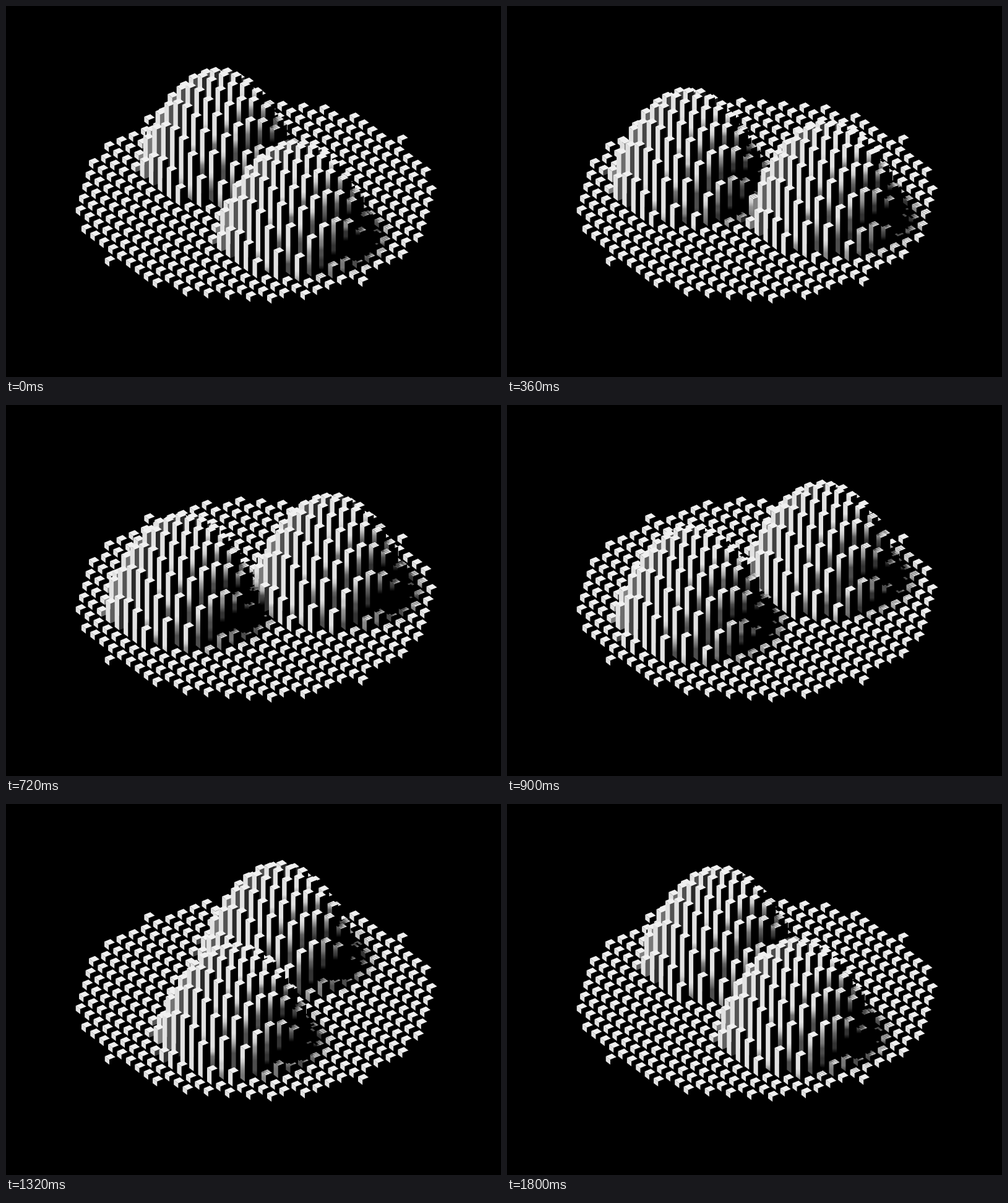
Recreate the animation shown at these times as an HTML page with a canvas. Size 800x600 px, loop 1.83 s.

```html
<!DOCTYPE html>
<html>
<head>
<meta charset="utf-8">
<style>
html, body { margin: 0; width: 100%; height: 100%; overflow: hidden; background: #000; }
canvas { display: block; }
</style>
</head>
<body>
<canvas id="stage" width="800" height="600"></canvas>
<script>
const ctx = document.getElementById('stage').getContext('2d');
const N = 12, SIZE = 2 * N + 1;   // disc radius in cells, grid side
const HALF = 0.25;                // half the width of a bar
const BASE = 0.4, PEAK = 6.9;     // heights in cells
const ORBIT = 5.02, DOME = 26.5;  // orbit radius, squared dome radius
const heights = new Float32Array(SIZE * SIZE);

// A soft lamp on the left: several directions, each [di, dj, dz] towards the lamp
const lamps = [];
for (const turn of [-0.2, 0, 0.2])
  for (const cot of [0.5, 0.64]) {
    const a = 0.76 + turn;
    lamps.push([-Math.sin(a) * cot, -Math.cos(a) * cot, 1]);
  }

const inDisc = (i, j) => i * i + j * j <= N * N;
const heightAt = (i, j) => heights[(i + N) * SIZE + j + N];
const project = (i, j, z) => [
  404.7 + 14.4 * i + 19.7 * j,
  318.6 + 10.9 * i - 8.17 * j - 20.2 * z
];

function setHeights(angle) {
  const ci = ORBIT * Math.cos(angle), cj = ORBIT * Math.sin(angle);
  for (let i = -N; i <= N; i++)
    for (let j = -N; j <= N; j++) {
      const d = Math.min((i - ci) ** 2 + (j - cj) ** 2, (i + ci) ** 2 + (j + cj) ** 2);
      const dome = d < DOME ? PEAK * (1 - d / DOME) ** 0.83 : 0;
      heights[(i + N) * SIZE + j + N] = inDisc(i, j) ? BASE + dome : 0;
    }
}

function blocked(i, j, z, [di, dj, dz]) {
  const step = 0.2;
  for (let s = 0.06; z + s * dz < PEAK + BASE; s += step) {
    const x = i + di * s, y = j + dj * s;
    const a = Math.round(x), b = Math.round(y);
    if (a < -N || a > N || b < -N || b > N) return false;
    if (Math.abs(x - a) < HALF && Math.abs(y - b) < HALF && z + s * dz < heightAt(a, b)) return true;
  }
  return false;
}

function light(i, j, z) {
  let seen = 0;
  for (const lamp of lamps) if (!blocked(i, j, z, lamp)) seen++;
  return seen / lamps.length;
}

function grey(amount, full) {
  const v = Math.round(full * amount ** 0.6);
  return `rgb(${v},${v},${v})`;
}

function quad(fill, ...points) {
  ctx.fillStyle = fill;
  ctx.beginPath();
  for (const p of points) ctx.lineTo(...project(...p));
  ctx.fill();
}

function drawTop(i, j, z) {
  const cells = 3, w = 2 * HALF / cells, parts = [];
  for (let a = 0; a < cells; a++)
    for (let b = 0; b < cells; b++) {
      const x = i - HALF + a * w, y = j - HALF + b * w;
      parts.push([x, y, light(x + w / 2, y + w / 2, z + 0.01)]);
    }
  const tile = (x, y, size, amount) => quad(grey(amount, 240),
    [x, y, z], [x + size, y, z], [x + size, y + size, z], [x, y + size, z]);
  const first = parts[0][2];
  if (parts.every(p => p[2] === first)) tile(i - HALF, j - HALF, 2 * HALF, first);
  else for (const [x, y, amount] of parts) tile(x, y, w, amount);
}

function drawLeft(i, j, z) {
  const y = j - HALF, stops = Math.max(2, Math.ceil(z / 0.4));
  const shade = ctx.createLinearGradient(0, project(i, y, z)[1], 0, project(i, y, 0)[1]);
  for (let k = 0; k <= stops; k++) {
    const level = Math.max(0.02, z * (1 - k / stops) - 0.02);
    const amount = (light(i - 0.13, y - 0.01, level) + light(i + 0.13, y - 0.01, level)) / 2;
    shade.addColorStop(k / stops, grey(amount, 226));
  }
  quad(shade, [i - HALF, y, z], [i + HALF, y, z], [i + HALF, y, 0], [i - HALF, y, 0]);
}

// The right face only gets light thrown back by a taller bar in front of it
function drawRight(i, j, z) {
  const x = i + HALF, rise = inDisc(i + 1, j) ? heightAt(i + 1, j) - z : 0;
  const bounce = rise > 0 ? Math.min(1, rise / 1.5) * light(i + 0.74, j, z + rise / 2) : 0;
  quad(grey(bounce, 130), [x, j - HALF, z], [x, j + HALF, z], [x, j + HALF, 0], [x, j - HALF, 0]);
}

function draw(frame) {
  setHeights(Math.PI * frame / 60 - 0.096);
  ctx.fillStyle = '#000';
  ctx.fillRect(0, 0, 800, 600);
  // back to front
  for (let i = -N; i <= N; i++)
    for (let j = N; j >= -N; j--) {
      if (!inDisc(i, j)) continue;
      const z = heightAt(i, j);
      drawRight(i, j, z);
      drawLeft(i, j, z);
      drawTop(i, j, z);
    }
}

let shown = -1;
function tick() {
  const frame = Math.floor(performance.now() % 1830 / 30);
  if (frame !== shown) draw(shown = frame);
  requestAnimationFrame(tick);
}
tick();
</script>
</body>
</html>
```
